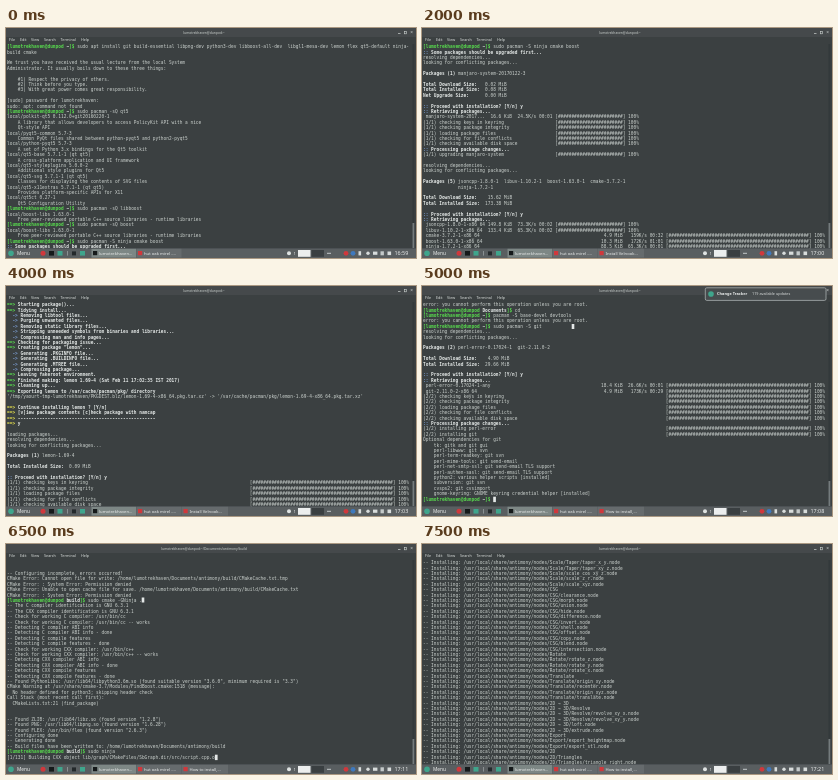
Write an HTML page with a canvas that moves like this. It is 410 px wide and 230 px high and loops after 8000 ms.

```html
<!DOCTYPE html>
<html lang="en">
<head>
<meta charset="utf-8">
<title>Terminal session</title>
<style>
html, body { margin: 0; width: 100%; height: 100%; overflow: hidden; background: #3b4041; }
canvas { display: block; width: 410px; height: 230px; }
</style>
</head>
<body>
<canvas id="stage" width="410" height="230"></canvas>
<script>
const ctx = document.getElementById('stage').getContext('2d');
const USER = 'lumotrekhaven', HOST = 'dunpod';
const ROWS = 38, CHAR = 2.7, LINE = 5.4, LEFT = 1, TOP = 19;
const LOOP = 8000;
const C = {
  bg: '#3b4041', bar: '#45494b', panel: '#595e60', text: '#ccd2cf', bold: '#e4e8e7',
  green: '#58dc4e', yellow: '#e2dc4c', blue: '#7a9bd0', red: '#d0383c', teal: '#3fa58c'
};

// pacman output helpers
const infoWidth = cols => Math.floor(cols * 0.6);
const bar = (s, cols = 149) => {
  const w = infoWidth(cols);
  return s.padEnd(w) + ' [' + '#'.repeat(cols - w - 8) + '] 100%';
};
const load = (name, tail, cols = 149) =>
  bar((' ' + name).padEnd(infoWidth(cols) - tail.length) + tail, cols);
const checks = (n, cols) => ['checking keys in keyring', 'checking package integrity',
  'loading package files', 'checking for file conflicts', 'checking available disk space']
  .map(s => bar(`(${n}/${n}) ${s}`, cols)).join('\n');
const resolve = 'resolving dependencies...\nlooking for conflicting packages...\n';
const proceed = ':: Proceed with installation? [Y/n] y';
const nodes = (dir, names = '') => ['', ...names.split(' ').filter(Boolean).map(n => `/${n}.node`)]
  .map(n => '-- Installing: /usr/local/share/antimony/nodes/' + dir + n).join('\n');
const compiler = (lang, bin) => `-- Check for working ${lang} compiler: /usr/bin/${bin}
-- Check for working ${lang} compiler: /usr/bin/${bin} -- works
-- Detecting ${lang} compiler ABI info
-- Detecting ${lang} compiler ABI info - done
-- Detecting ${lang} compile features
-- Detecting ${lang} compile features - done`;
const denied = 'CMake Error: : System Error: Permission denied';
const noRoot = 'error: you cannot perform this operation unless you are root.';
const boostLib = `local/boost-libs 1.63.0-1
    Free peer-reviewed portable C++ source libraries - runtime libraries`;

// "@dir command" is a prompt; "%%n" ends a screen, leaving n rows free
const session = `@~ sudo apt install git build-essential libpng-dev python3-dev libboost-all-dev  libgl1-mesa-dev lemon flex qt5-default ninja-
build cmake

We trust you have received the usual lecture from the local System
Administrator. It usually boils down to these three things:

    #1) Respect the privacy of others.
    #2) Think before you type.
    #3) With great power comes great responsibility.

[sudo] password for ${USER}:
sudo: apt: command not found
@~ sudo pacman -sQ qt5
local/polkit-qt5 0.112.0+git20160220-1
    A library that allows developers to access PolicyKit API with a nice
    Qt-style API
local/pyqt5-common 5.7-3
    Common PyQt files shared between python-pyqt5 and python2-pyqt5
local/python-pyqt5 5.7-3
    A set of Python 3.x bindings for the Qt5 toolkit
local/qt5-base 5.7.1-1 (qt qt5)
    A cross-platform application and UI framework
local/qt5-styleplugins 5.0.0-2
    Additional style plugins for Qt5
local/qt5-svg 5.7.1-1 (qt qt5)
    Classes for displaying the contents of SVG files
local/qt5-x11extras 5.7.1-1 (qt qt5)
    Provides platform-specific APIs for X11
local/qt5ct 0.27-1
    Qt5 Configuration Utility
@~ sudo pacman -sQ libboost
${boostLib}
@~ sudo pacman -sQ boost
${boostLib}
@~ sudo pacman -S ninja cmake boost
:: Some packages should be upgraded first...
%%0
${resolve}
Packages (1) manjaro-system-20170122-3

Total Download Size:   0.02 MiB
Total Installed Size:  0.08 MiB
Net Upgrade Size:      0.00 MiB

${proceed}
%%0
:: Retrieving packages...
${load('manjaro-system-2017...', '16.6 KiB  24.5K/s 00:01', 80)}
${checks(1, 80)}
:: Processing package changes...
${bar('(1/1) upgrading manjaro-system', 80)}

${resolve}
%%0
Packages (5) jsoncpp-1.8.0-1  libuv-1.10.2-1  boost-1.63.0-1  cmake-3.7.2-1
             ninja-1.7.2-1

Total Download Size:    15.62 MiB
Total Installed Size:  173.38 MiB

${proceed}
:: Retrieving packages...
${load('jsoncpp-1.8.0-1-x86_64', '149.8 KiB  73.3K/s 00:02', 80)}
${load('libuv-1.10.2-1-x86_64', '133.4 KiB  65.3K/s 00:02', 80)}
${load('cmake-3.7.2-1-x86_64', '4.9 MiB   159K/s 00:32')}
${load('boost-1.63.0-1-x86_64', '10.3 MiB   172K/s 01:01')}
${load('ninja-1.7.2-1-x86_64', '88.5 KiB  65.3K/s 00:01')}
%%0
${checks(5)}
:: Processing package changes...
${bar('(1/5) installing jsoncpp')}
${bar('(2/5) installing libuv')}
${bar('(3/5) installing cmake')}
Optional dependencies for cmake
    qt5-base: cmake-gui [installed]
${bar('(4/5) installing boost')}
${bar('(5/5) installing ninja')}
@~ sudo pacman -S lemon
error: target not found: lemon
@~ yaourt -S lemon

==> Downloading lemon PKGBUILD from AUR...
x .SRCINFO
x PKGBUILD
x lemon_share.diff

%%0
PKGBUILD without package() is deprecated, please update:

pkgname=lemon
pkgrel=3
pkgver=1.69
pkgdesc="The LEMON LALR Parser Generator used in sqlite."
arch=('i686' 'x86_64')
url="http://www.hwaci.com/sw/lemon/"
license=('custom')
depends=()
source=('lemon.c::http://www.sqlite.org/src/raw/tool/lemon.c?name=680980c7935bfa1edec20c804c9e5ba4b1dd96f5'
'lempar.c::http://www.sqlite.org/src/raw/tool/lempar.c?name=01ca97f87610d1dac6d8cd96ab109ab1130e76dc'
lemon_share.diff)

build() {
mkdir -p \${srcdir}/build
cd build
cp \${srcdir}/lemon.c \${srcdir}/lempar.c .
patch -Np0 -i \${srcdir}/lemon_share.diff
make lemon
}

package() {
cd \${srcdir}/build
install -Dm755 lemon $pkgdir/usr/bin/lemon
install -Dm644 lempar.c $pkgdir/usr/share/lemon/lempar.c
}

md5sums=('1e13360f6609275f2e78816911a3ed7'
'fbf6255b88d54cf284c833da8d9ee5d2'
'20eedecfc5dce37ae6ef5055ac3f8a33')

Bremol commented on 2014-11-18 11:35
mkdir -p \${srcdir}/build fails if the directory already exists, e.g. from previous builds. Please use

[ -d \${srcdir}/build ] || mkdir -p \${srcdir}/build

tolvari commented on 2014-12-16 20:11
%%0
Thanks, the build works again with the latest changes.

lemon 1.69-4  (2015-01-08 10:24)

==> Edit PKGBUILD ? [Y/n] ("A" to abort)
==> ------------------------------------
==> n

==> lemon dependencies:

==> Continue building lemon ? [Y/n]
==> -------------------------------
==> y

==> Building and installing package
==> Making package: lemon 1.69-4 (Sat Feb 11 17:02:25 IST 2017)
==> Checking runtime dependencies...
==> Checking buildtime dependencies...
==> Retrieving sources...
  -> Downloading lemon.c...
  -> Downloading lempar.c...
  -> Found lemon_share.diff
==> Validating source files with md5sums...
    lemon.c ... Passed
    lempar.c ... Passed
    lemon_share.diff ... Passed
==> Extracting sources...
==> Starting build()...
patching file lemon.c
cc     lemon.c   -o lemon
==> Entering fakeroot environment...
%%0
==> Starting package()...
==> Tidying install...
  -> Removing libtool files...
  -> Purging unwanted files...
  -> Removing static library files...
  -> Stripping unneeded symbols from binaries and libraries...
  -> Compressing man and info pages...
==> Checking for packaging issue...
==> Creating package "lemon"...
  -> Generating .PKGINFO file...
  -> Generating .BUILDINFO file...
  -> Generating .MTREE file...
  -> Compressing package...
==> Leaving fakeroot environment.
==> Finished making: lemon 1.69-4 (Sat Feb 11 17:02:35 IST 2017)
==> Cleaning up...
==> Exporting lemon to /var/cache/pacman/pkg/ directory
'/tmp/yaourt-tmp-${USER}/PKGDEST.blz/lemon-1.69-4-x86_64.pkg.tar.xz' -> '/var/cache/pacman/pkg/lemon-1.69-4-x86_64.pkg.tar.xz'

==> Continue installing lemon ? [Y/n]
==> [v]iew package contents [c]heck package with namcap
==> ---------------------------------------------------
==> y

loading packages...
${resolve}
Packages (1) lemon-1.69-4

Total Installed Size:  0.09 MiB

${proceed}
${checks(1)}
%%0
:: Processing package changes...
${bar('(1/1) installing lemon')}
@~ sudo pacman -S flex
warning: flex-2.6.3-1 is up to date -- reinstalling
${resolve}
Packages (1) flex-2.6.3-1

Total Installed Size:  0.91 MiB
Net Upgrade Size:      0.00 MiB

${proceed}
${checks(1)}
:: Processing package changes...
${bar('(1/1) reinstalling flex')}
@~ cd Documents
@Documents git clone https://github.com/mkeeter/antimony
bash: git: command not found
@Documents pacman -S git
%%0
${noRoot}
@Documents cd
@~ pacman -S base-devel devtools
${noRoot}
@~ sudo pacman -S git
${resolve}
Packages (2) perl-error-0.17024-1  git-2.11.0-2

Total Download Size:    4.90 MiB
Total Installed Size:  29.66 MiB

${proceed}
:: Retrieving packages...
${load('perl-error-0.17024-1-any', '18.4 KiB  26.6K/s 00:01')}
${load('git-2.11.0-2-x86_64', '4.9 MiB   173K/s 00:29')}
${checks(2)}
:: Processing package changes...
${bar('(1/2) installing perl-error')}
${bar('(2/2) installing git')}
Optional dependencies for git
    tk: gitk and git gui
    perl-libwww: git svn
    perl-term-readkey: git svn
    perl-mime-tools: git send-email
    perl-net-smtp-ssl: git send-email TLS support
    perl-authen-sasl: git send-email TLS support
    python2: various helper scripts [installed]
    subversion: git svn
    cvsps2: git cvsimport
    gnome-keyring: GNOME keyring credential helper [installed]
@~ 
%%1
@~ cd Documents
@Documents git clone https://github.com/mkeeter/antimony
Cloning into 'antimony'...
remote: Counting objects: 14025, done.
remote: Total 14025 (delta 0), reused 0 (delta 0)
Receiving objects: 100% (14025/14025), 4.62 MiB | 168.00 KiB/s, done.
Resolving deltas: 100% (10213/10213), done.
@Documents cd antimony
@antimony ls
%%0
app  CMakeLists.txt  doc  lib  LICENSE.txt  py  README.md  util
@antimony mkdir build
mkdir: cannot create directory 'build': File exists
@antimony cd build
@build cmake -GNinja ..
-- The C compiler identification is GNU 6.3.1
-- The CXX compiler identification is GNU 6.3.1
${compiler('C', 'cc')}
${compiler('CXX', 'c++')}
%%0


-- Configuring incomplete, errors occurred!
CMake Error: Cannot open file for write: /home/${USER}/Documents/antimony/build/CMakeCache.txt.tmp
${denied}
CMake Error: Unable to open cache file for save. /home/${USER}/Documents/antimony/build/CMakeCache.txt
${denied}
@build sudo cmake -GNinja ..
-- The C compiler identification is GNU 6.3.1
-- The CXX compiler identification is GNU 6.3.1
${compiler('C', 'cc')}
${compiler('CXX', 'c++')}
-- Found PythonLibs: /usr/lib64/libpython3.6m.so (found suitable version "3.6.0", minimum required is "3.3")
CMake Warning at /usr/share/cmake-3.7/Modules/FindBoost.cmake:1518 (message):
  No header defined for python3; skipping header check
Call Stack (most recent call first):
  CMakeLists.txt:21 (find_package)


-- Found ZLIB: /usr/lib64/libz.so (found version "1.2.8")
-- Found PNG: /usr/lib64/libpng.so (found version "1.6.28")
-- Found FLEX: /usr/bin/flex (found version "2.6.3")
-- Configuring done
-- Generating done
-- Build files have been written to: /home/${USER}/Documents/antimony/build
@build sudo ninja
[1/131] Building CXX object lib/graph/CMakeFiles/SbGraph.dir/src/script.cpp.o
%%1
[131/131] Linking CXX executable app/antimony
@build sudo ninja install
[0/1] Install the project...
-- Install configuration: "RELEASE"
-- Installing: /usr/local/bin/antimony
${nodes('Meta', 'bounds shape')}
${nodes('Variables', 'float int string point2d point3d')}
${nodes('Text', 'text letter')}
${nodes('Iterate', 'iterate_x iterate_xy iterate_polar')}
${nodes('Reflect', 'reflect_x reflect_y reflect_z reflect_xy reflect_xz reflect_yz')}
${nodes('Deform', 'attract repel twirl_x twirl_y twirl_z shear_x_y')}
${nodes('3D', 'cube sphere cylinder cone torus')}
%%0
${nodes('Scale', 'scale_x scale_y scale_z')}
${nodes('Scale/Taper', 'taper_x_y taper_xy_z')}
${nodes('Scale', 'scale_cos_xy_z scale_z_r scale_xyz').split('\n').slice(1).join('\n')}
${nodes('CSG', 'clearance morph union hide difference invert shell offset copy blend intersection')}
${nodes('Rotate', 'rotate_z rotate_y rotate_x')}
${nodes('Translate', 'origin_xy recenter origin_xyz translate')}
${nodes('2D → 3D')}
${nodes('2D → 3D/Revolve', 'revolve_xy_x revolve_xy_y')}
${nodes('2D → 3D', 'loft extrude').split('\n').slice(1).join('\n')}
${nodes('Export', 'export_heightmap export_stl')}
${nodes('2D')}
${nodes('2D/Triangles', 'triangle_right')}
%%0`;

const log = [], views = [];
for (const line of session.split('\n')) {
  if (line.startsWith('%%')) views.push({ end: log.length, free: +line[2] });
  else log.push(line);
}

const clocks = ('16:59 16:59 17:00 17:00 17:03 17:03 17:03 17:03 ' +
  '17:07 17:08 17:09 17:10 17:11 17:18 17:21').split(' ');
const folders = { 8: '/Documents', 10: '/Documents', 11: '/Documents/antimony', 12: '/Documents/antimony/build' };
const pointers = { 9: [151, 40.5], 12: [137, 56] };
const NOTICE = 9, SCROLLED = 5;

function rect(x, y, w, h, color) {
  ctx.fillStyle = color;
  ctx.fillRect(x, y, w, h);
}

function dot(x, y, r, color) {
  ctx.fillStyle = color;
  ctx.beginPath();
  ctx.arc(x, y, r, 0, 7);
  ctx.fill();
}

function write(s, x, y, font, color, align = 'left') {
  ctx.save();
  ctx.translate(x, y);
  ctx.scale(0.3, 0.3);
  ctx.font = font;
  ctx.textAlign = align;
  ctx.textBaseline = 'middle';
  ctx.fillStyle = color;
  ctx.fillText(s, 0, 0);
  ctx.restore();
}

const label = (s, x, y, size = 12.5, color = '#dde0df', align = 'left') =>
  write(s, x, y, `${size}px "Noto Sans", sans-serif`, color, align);

// Splits a line into [text, colour, bold] parts
function parts(line) {
  const prompt = line.match(/^@(\S+) (.*)/);
  if (prompt) return [
    [`[${USER}@${HOST} `, C.green, 1], [prompt[1], C.bold, 1], [']$ ', C.green, 1], [prompt[2], C.text]
  ];
  if (line.includes(' commented on ')) return [[line, C.yellow, 1]];
  const mark = line.match(/^(==>|  ->|::)(.*)/);
  if (mark) {
    const ask = /\?|\[v\]|---|==> [yn]$/.test(line);
    const color = mark[1] !== '==>' ? C.blue : ask ? C.yellow : C.green;
    return [[mark[1], color, 1], [mark[2], C.bold, 1]];
  }
  const size = line.match(/^(Packages \(\d\)|(?:Total|Net) \w+ Size:)(.*)/);
  return size ? [[size[1], C.bold, 1], [size[2], C.text]] : [[line, C.text]];
}

function drawTerminal({ end, free }) {
  let col = 0, y = TOP;
  log.slice(end - ROWS + free, end).forEach((line, i) => {
    col = 0;
    y = TOP + i * LINE;
    for (const [s, color, bold] of parts(line)) {
      write(s, LEFT + col * CHAR, y, `${bold ? 'bold ' : ''}14.95px "DejaVu Sans Mono", monospace`, color);
      col += s.length;
    }
  });
  if (free) rect(LEFT + col * CHAR, y - 2.7, CHAR, LINE, C.bold);
}

function drawFrame(i) {
  rect(0, 0, 410, 9, C.bar);
  label(`${USER}@${HOST}:~${folders[i] || ''}`, 198, 5, 11, C.text, 'center');
  rect(392, 5, 2.5, 0.7, C.text);
  ctx.strokeStyle = C.text;
  ctx.lineWidth = 0.6;
  ctx.strokeRect(398.3, 3.4, 2.4, 2.4);
  label('×', 405.5, 4.6, 16, C.text, 'center');
  [['File', 3], ['Edit', 14], ['View', 25], ['Search', 38], ['Terminal', 54.5], ['Help', 75]]
    .forEach(([s, x]) => label(s, x, 12.4));
  rect(406.5, 16, 1.8, 204, '#33393b');
  rect(406.5, i === SCROLLED ? 122 : 195, 1.8, 25, '#747b7d');
}

function task(x, w, s, color, active) {
  rect(x, 220.8, w, 8.8, active ? '#7d8785' : '#666b6d');
  rect(x + 1.5, 223, 4.2, 4.2, color);
  label(s, x + 7.5, 225.4, 14, '#eceeed');
}

function drawPanel(i) {
  rect(0, 220.4, 410, 9.6, C.panel);
  dot(5, 225.3, 2.8, C.teal);
  label('Menu', 11, 225.4, 16, '#eceeed');
  dot(37, 225.3, 2.5, C.red);
  rect(43, 223, 5, 4.6, '#15191a');
  rect(51.5, 223, 5, 4.6, C.teal);
  rect(61, 223, 1, 4.6, '#8a9092');
  rect(66, 223.4, 4, 4, '#24292b');
  rect(74, 223, 5, 4.6, C.teal);
  task(85.5, 44.5, USER + '...', '#15191a', true);
  task(130.5, 45, 'hut oak mirel -...', C.red);
  if (i > 1) task(176, 46, i < 8 ? 'Install Velnook...' : 'How to install,...', C.red);
  dot(283, 225.3, 2, '#dfe3e2');
  label('1', 287.5, 225.4, 14);
  rect(292, 222, 12.5, 6.8, '#eceeee');
  rect(305.5, 222, 12.5, 6.8, '#3a3f41');
  rect(321, 224.8, 4, 1, '#c4c9c9');
  dot(340, 225.3, 2.4, C.red);
  dot(347, 225.3, 2.4, '#3f79bd');
  rect(352.5, 223.2, 2.6, 4.2, '#d8dcdb');
  dot(362, 225.3, 1.7, '#d8dcdb');
  rect(367, 223.6, 4.4, 3.2, '#d8dcdb');
  rect(374.5, 223.3, 3.4, 4, '#c4c9c9');
  rect(381.5, 223.5, 3.6, 3.6, '#d8dcdb');
  label(clocks[i], 388.5, 225.4, 18, '#eceeed');
}

function drawNotice() {
  ctx.beginPath();
  ctx.roundRect(283.3, 1.8, 120.7, 12.6, 1.5);
  ctx.fillStyle = '#474c4e';
  ctx.fill();
  ctx.strokeStyle = '#a9afaf';
  ctx.lineWidth = 0.8;
  ctx.stroke();
  dot(289, 8, 2.8, C.teal);
  write('Change Tracker', 295, 8.2, 'bold 13px "Noto Sans", sans-serif', '#f0f2f2');
  label('119 available updates', 330, 8.2);
}

function draw(i) {
  rect(0, 0, 410, 230, C.bg);
  drawTerminal(views[i]);
  drawFrame(i);
  drawPanel(i);
  if (i === NOTICE) drawNotice();
  if (pointers[i]) rect(pointers[i][0] - 1.3, pointers[i][1] - 2.5, 2.6, 5, C.bold);
}

let shown = -1;
const start = performance.now();
function tick() {
  const t = (performance.now() - start) % LOOP;
  const i = Math.max(0, Math.floor(t / 500) - 1);
  if (i !== shown) draw(shown = i);
  requestAnimationFrame(tick);
}
tick();
</script>
</body>
</html>
```
